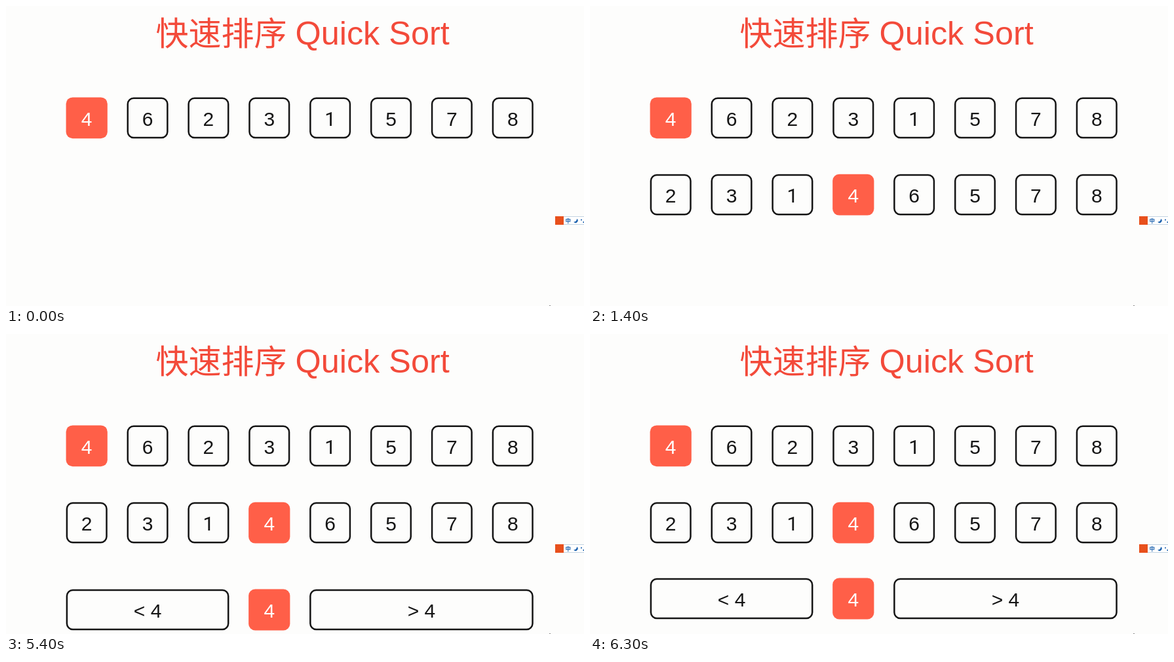
Recreate the animation shown at these times as an HTML page with a canvas. Size 882 px wide and 458 px high, loop 6500 ms.

```html
<!DOCTYPE html>
<html lang="zh">
<head>
<meta charset="utf-8">
<title>快速排序 Quick Sort</title>
<style>
html, body { margin: 0; width: 100%; height: 100%; overflow: hidden; background: #fdfdfc; }
canvas { display: block; }
</style>
</head>
<body>
<canvas id="stage" width="882" height="458"></canvas>
<script>
const ctx = document.getElementById('stage').getContext('2d');
const LOOP = 6500, TICK = 100;
const LEFT = 91.6, PITCH = 92.86, SIZE = 63.2, HEIGHT = 62.8;
const RED = '#ff5f48', INK = '#151515', BLUE = '#1c62ae';
const SANS = '"Liberation Sans", Arial, sans-serif';
const CJK = '"Noto Sans CJK SC", "Noto Sans CJK", sans-serif';

function text(str, x, y, font, color, align = 'left') {
  ctx.font = font;
  ctx.fillStyle = color;
  ctx.textAlign = align;
  ctx.fillText(str, x, y);
}

// A box covers one or more columns.
function box(label, col, top, span = 1, pivot = false) {
  const x = LEFT + col * PITCH;
  const w = SIZE + (span - 1) * PITCH;
  ctx.beginPath();
  if (pivot) {
    ctx.roundRect(x, top, w, HEIGHT, 10);
    ctx.fillStyle = RED;
    ctx.fill();
  } else {
    ctx.roundRect(x + 1.3, top + 1.3, w - 2.6, HEIGHT - 2.6, 9);
    ctx.strokeStyle = INK;
    ctx.lineWidth = 2.5;
    ctx.stroke();
  }
  // Roboto draws the digit 1 without a foot.
  const family = label === '1' ? 'Roboto, sans-serif' : SANS;
  text(label, x + w / 2, top + 43.3, '30px ' + family, pivot ? '#fff' : INK, 'center');
}

function row(digits, top) {
  [...digits].forEach((d, i) => box(d, i, top, 1, d === '4'));
}

function split(top) {
  box('< 4', 0, top, 3);
  box('4', 3, top, 1, true);
  box('> 4', 4, top, 4);
}

// Offset from rest, one step per tick; the last value holds.
function settle(t, start, offsets) {
  const step = Math.floor((t - start) / TICK);
  return offsets[Math.min(step, offsets.length - 1)];
}

function title() {
  text('快速排序', 228.5, 60, '50px ' + CJK, '#f34a3a');
  text('Quick Sort', 441.5, 59, '50.4px ' + SANS, '#f34a3a');
}

function toolbar() {
  ctx.fillStyle = '#fff';
  ctx.strokeStyle = '#c3d3e2';
  ctx.lineWidth = 1;
  ctx.beginPath();
  ctx.roundRect(846.5, 321.5, 44, 12, 2);
  ctx.fill();
  ctx.stroke();
  ctx.fillStyle = '#e8501c';
  ctx.fillRect(838, 321, 13, 13);
  text('中', 853.5, 331, 'bold 8.5px ' + CJK, BLUE);
  ctx.beginPath();
  ctx.arc(869, 327.5, 3.6, -0.9, 2.5);
  ctx.quadraticCurveTo(870.5, 329.5, 871.2, 324.7);
  ctx.fill();
  ctx.beginPath();
  ctx.arc(878, 326.5, 1.1, 0, 7);
  ctx.fill();
  ctx.fillRect(880.5, 329, 1.5, 2);
}

function draw(t) {
  ctx.fillStyle = '#fdfdfc';
  ctx.fillRect(0, 0, 882, 458);
  title();
  row('46231578', 139.4);
  if (t >= 1200) row('23146578', 256.8 + settle(t, 1200, [162.6, 18, 0]));
  if (t >= 5400) split(372.6 + settle(t, 5400, [17, -4, 0]));
  toolbar();
  ctx.fillStyle = '#888';
  ctx.fillRect(829, 457, 2, 1);
}

const begin = performance.now();
function loop() {
  draw((performance.now() - begin) % LOOP);
  requestAnimationFrame(loop);
}
loop();
</script>
</body>
</html>
```
